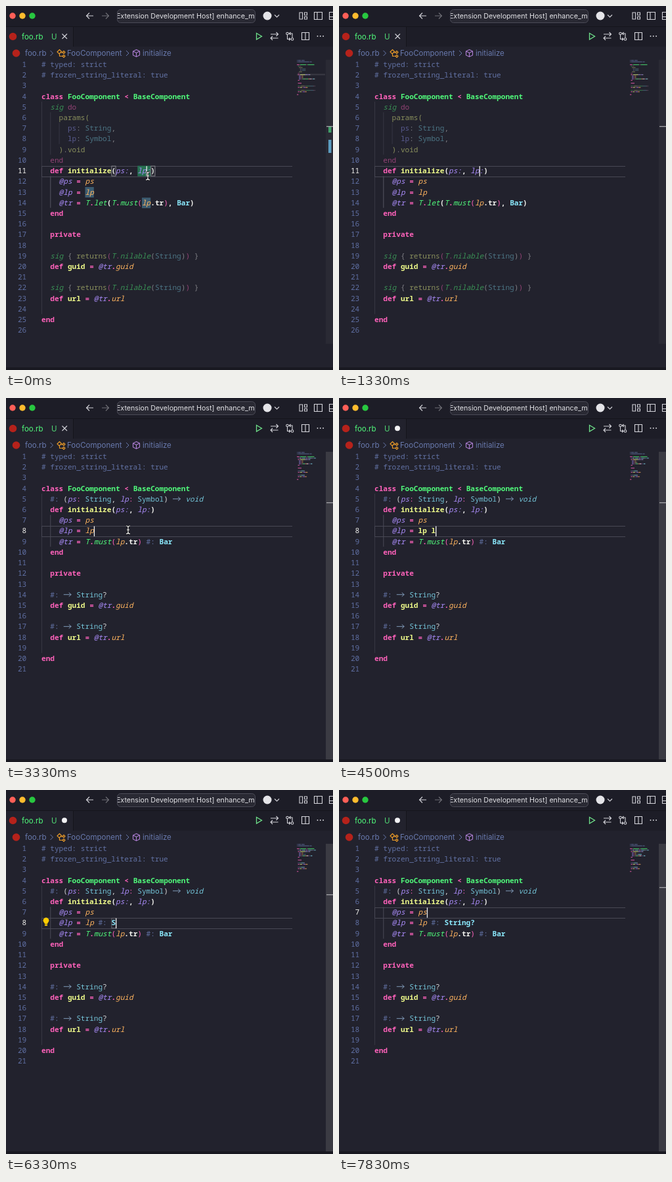
These frames come from a looping animation (498x555 px, 8 s). An HTML page:

```html
<!DOCTYPE html>
<html lang="en">
<head>
<meta charset="utf-8">
<title>Editor</title>
<style>
  html, body { margin: 0; width: 100%; height: 100%; overflow: hidden; background: #22222d; }
  svg { display: block; }
  text { white-space: pre; }
  .code text, .pop text { font: 11.08px "Noto Sans Mono", "DejaVu Sans Mono", monospace; }
  .ui text { font: 11.5px Inter, "Open Sans", sans-serif; }
  .line { fill: none; stroke: #d4d4da; stroke-width: 1.1; }
</style>
</head>
<body>
<svg width="498" height="555" viewBox="0 0 498 555">
  <defs><clipPath id="box"><rect x="170" y="5" width="209" height="20"/></clipPath></defs>
  <rect width="498" height="555" fill="#22222d"/>
  <rect width="498" height="62" fill="#1d1d27"/>
  <rect y="31" width="102" height="31" fill="#22222d"/>
  <path d="M0 31.5H498M102.5 31V62" stroke="#15151c" fill="none"/>
  <rect y="551" width="498" height="4" fill="#191921"/>
  <g class="ui">
    <circle cx="10" cy="15" r="4.7" fill="#ff5f57"/>
    <circle cx="25" cy="15" r="4.7" fill="#febc2e"/>
    <circle cx="40" cy="15" r="4.7" fill="#28c840"/>
    <path class="line" d="M133 15H122.500M127 10.500L122.500 15L127 19.500"/>
    <path class="line" stroke-opacity=".45" d="M146 15H156.500M152 10.500L156.500 15L152 19.500"/>
    <rect x="169.500" y="5.500" width="210" height="20" rx="5" fill="#292933" stroke="#4b4b57"/>
    <text x="378.500" y="19" text-anchor="end" clip-path="url(#box)" fill="#e2e2e6" style="font-size:10.7px">[Extension Development Host] enhance_m</text>
    <circle cx="398" cy="15" r="6.500" fill="#e4e4e8"/>
    <path class="line" d="M409 13.500L412.500 17L416 13.500"/>
    <path class="line" d="M447 10H451.500V20H447ZM454.500 10H458.500V14H454.500ZM454.500 16.500H458.500V20H454.500Z"/>
    <path class="line" d="M469.500 9.500H481.500V20.500H469.500ZM474 9.500V20.500M492.500 9.500H504V20.500H492.500ZM492.500 16.500H504"/>
    <circle cx="10.500" cy="46.500" r="5.800" fill="#b5221b"/>
    <text x="24" y="50.500" fill="#50fa7b">foo.rb</text>
    <text x="69" y="50.500" fill="#50d874">U</text>
    <path id="close" class="line" d="M85.500 42.500L93 50M93 42.500L85.500 50"/>
    <circle id="dirty" cx="89" cy="46.300" r="4" fill="#f2f2f4"/>
    <path d="M381.500 41.500L389.500 46.200L381.500 51Z" fill="none" stroke="#6fe08a" stroke-width="1.300"/>
    <path class="line" d="M403 43H414.500M411.500 40L414.500 43L411.500 46M414.500 49H403M406 46L403 49L406 52"/>
    <g class="line">
      <circle cx="428.500" cy="42" r="1.800"/><circle cx="436" cy="50.500" r="1.800"/>
      <path d="M428.500 44V50.500H432.500M431 48.500L433 50.500L431 52.500M436 48.500V42H432M433.500 40L431.500 42L433.500 44"/>
      <path d="M450.500 40.500H461.500V51.500H450.500ZM456 40.500V51.500"/>
    </g>
    <path d="M474.500 46H484" stroke="#d4d4da" stroke-width="1.900" stroke-linecap="round" stroke-dasharray="0 4.300"/>
    <circle cx="15.500" cy="72" r="5.800" fill="#b5221b"/>
    <g fill="#6879ad">
      <text x="29" y="76">foo.rb</text><text x="93" y="76">FooComponent</text><text x="208" y="76">initialize</text>
    </g>
    <path d="M67.500 68L71.500 72L67.500 76M183 68L187 72L183 76" fill="none" stroke="#6879ad"/>
    <path d="M78 70L81.500 66.500L84.500 69.500L81 73ZM83 71H86M81.500 72V76.500H86M86 70.500L88 68.500L90 70.500L88 72.500ZM86 76.500L88 74.500L90 76.500L88 78.500Z" fill="none" stroke="#ee9d28" stroke-width="1.100"/>
    <path d="M198.500 66.500L203.500 69V75L198.500 77.500L193.500 75V69ZM193.500 69L198.500 71.500L203.500 69M198.500 71.500V77.500" fill="none" stroke="#b180d7" stroke-width="1.100"/>
  </g>
  <g id="view" class="code"></g>
</svg>
<script>
const CW = 6.65, LH = 16.21, X0 = 54, LOOP = 8000;
const $ = id => document.getElementById(id);

// style key -> [colour, weight, italic]
const STYLE = {
  k: ['#ff62bb', 600, 0], y: ['#eefa8a', 600, 0], w: ['#f4f4f0', 600, 0], v: ['#a98bf8', 500, 1],
  p: ['#ffb45f', 500, 1], o: ['#ffb45f', 500, 1], g: ['#50fa7b', 500, 1], G: ['#50fa7b', 600, 0],
  c: ['#8be9fd', 600, 0], n: ['#6272a4', 400, 0], t: ['#74c4d8', 400, 0], i: ['#74c4d8', 400, 1],
  u: ['#a98bf8', 400, 1], b: ['#8f93f0', 400, 0], m: ['#ff62bb', 400, 0], x: ['#d8d8d8', 400, 0],
  a: ['#7f9ab8', 400, 0]
};

// a line is "style+text|style+text"; a leading ~ dims it
const HEAD = ['n# typed: strict', 'n# frozen_string_literal: true', '',
  'kclass |GFooComponent |k< |GBaseComponent'];
const INIT = 'k  def |yinitialize|w(|vps:|w, |vlp:|w)';
const PS = 'v    @ps|k = |pps', LP = 'v    @lp|k = ', TR = 'v    @tr|k = |gT';
const MUST = 'k.|gmust|m(|plp|w.tr|m)';
const LET = TR + '|k.|glet|w(|gT|' + MUST + '|w, |cBar|w)';
const GUID = 'k  def |yguid|k = |v@tr|k.|oguid', URL_LINE = 'k  def |yurl|k = |v@tr|k.|ourl';
const SIG = '~g  sig|x { |yreturns|m(|gT|k.|gnilable|x(|tString|x)|m)|x }';
const RBS = 'n  #: |a->|t String|x?';
const END = 'k  end', PRIVATE = 'k  private';

const oldDoc = [...HEAD, '~g  sig |kdo', '~y    params(', '~b      ps|x: |tString|x,', '~b      lp|x: |tSymbol|x,',
  '~y    )|x.|yvoid', '~k  end', INIT, PS, LP + '|plp', LET, END, '', PRIVATE, '',
  SIG, GUID, '', SIG, URL_LINE, '', 'kend', ''];
const newDoc = s => [...HEAD, 'n  #: |x(|ups|m: |tString|x, |ulp|m: |tSymbol|x) |a->|i void', INIT, PS,
  LP + '|' + s.lp, s.moved ? TR + '|' + MUST + '|n #: |cBar' : LET, END, '', PRIVATE, '',
  RBS, GUID, '', RBS, URL_LINE, '', 'kend', ''];

// state changes over time, each merged into the one before
const scenes = [];
let last = {};
const at = (t, change) => scenes.push(last = { ...last, ...change, t });
const typing = (t, step, text, make) =>
  [...text].forEach((_, i) => at(t + i * step, make(text.slice(0, i + 1))));

at(0, { old: true, lp: 'plp', line: 11, col: 24, marks: true, mouse: [216, 259] });
at(1170, { marks: false, mouse: null });
at(1670, { old: false, plain: true, line: 18, col: 0 });
at(2330, { plain: false });
at(2830, { moved: true, line: 9, col: 30 });
at(3170, { line: 8, col: 12, mouse: [186, 201] });
typing(4320, 160, ' let', s => ({ lp: 'ylp' + s, col: 12 + s.length, dirty: true, mouse: null, popup: s.length > 2 }));
at(5670, { lp: 'plp|n #: |cType', col: 20, popup: false, field: 4 });
typing(6170, 170, 'String?', s => ({ lp: 'plp|n #: |c' + s, col: 16 + s.length, field: s.length, bulb: s.length < 3 }));
at(7670, { line: 7, col: 12, field: 0, bulb: false });

const mid = n => 89 + LH * (n - 1);
const colX = c => X0 + CW * c;
const esc = s => s.replace(/&/g, '&amp;').replace(/</g, '&lt;');
const rect = (x, y, w, h, fill, more = '') => `<rect x="${x}" y="${y}" width="${w}" height="${h}" fill="${fill}" ${more}/>`;
const path = (d, stroke, w = 1) => `<path d="${d}" fill="none" stroke="${stroke}" stroke-width="${w}"/>`;
const text = (x, y, s, fill, weight = 400, italic = 0, more = '') =>
  `<text x="${x.toFixed(2)}" y="${y.toFixed(2)}" fill="${fill}" style="font-weight:${weight};font-style:${italic ? 'italic' : 'normal'};${more}">${esc(s)}</text>`;

function tokens(line) {
  let col = 0;
  return line.replace('~', '').split('|').filter(Boolean).map(part => {
    const token = { key: part[0], s: part.slice(1), col };
    col += token.s.length;
    return token;
  });
}

function codeLine(line, x, y, plain) {
  const dim = line[0] === '~';
  const out = tokens(line).map(({ key, s, col }) => {
    const [fill, weight, italic] = STYLE[plain && key === 'p' ? 'w' : key];
    const tx = x + col * CW;
    if (key === 'a') return path(`M${tx + .5} ${y - 4}h11.500m-3.500 -3l3.500 3l-3.500 3`, fill);
    return text(tx, y, s, fill, dim ? 400 : weight, italic);
  }).join('');
  return dim ? `<g opacity=".5">${out}</g>` : out;
}

function minimap(doc) {
  let out = '';
  doc.forEach((line, i) => tokens(line).forEach(({ key, s, col }) => {
    for (const word of s.matchAll(/\S+/g))
      out += rect(443 + (col + word.index) * .78, 82.4 + i * 2.17, word[0].length * .78, 1.2, STYLE[key][0], `opacity="${line[0] === '~' ? .35 : .7}"`);
  }));
  return out;
}

function guides(old) {
  const bar = (col, a, b, color = '#373743') => path(`M${colX(col) + .5} ${mid(a) - 8}V${mid(b) + 8}`, color);
  return old
    ? bar(0, 5, 24) + bar(2, 6, 9) + bar(4, 7, 8) + bar(2, 12, 14, '#555562')
    : bar(0, 5, 19) + bar(2, 7, 9, '#4b4b58');
}

function marks() {
  const hit = (line, col, n, fill) => rect(colX(col), mid(line) - 7.5, CW * n, 16, fill);
  const bracket = col => rect(colX(col) + .5, mid(11) - 7, CW - .5, 15, 'none', 'stroke="#85858c"');
  return hit(11, 22, 3, '#277052') + hit(13, 10, 2, '#3b5b70') + hit(14, 23, 2, '#3b5b70') + bracket(16) + bracket(25);
}

function popup() {
  const note = (s, y) => text(133.5, y, s, '#b9b9c0');
  return '<g class="pop">' + rect(128.5, 210.5, 380, 107.5, '#1e1e28', 'stroke="#3b3b48"') +
    rect(129, 211, 369, 17.5, '#42455a') +
    rect(133.5, 214.5, 10, 10, 'none', 'stroke="#d8d8dc" stroke-dasharray="1.500 1.500"') +
    text(149, 223.5, 'let', '#8be9fd', 600) + text(467, 223, 'RBS le', '#c4c4cc', 400, 0, 'font-size:9.600px') +
    text(131, 240, 'abc', '#d4d4da', 400, 0, 'font-family:Inter,sans-serif;font-size:8px') +
    [['frozen_string_', 0], ['l', 14], ['i', 15], ['te', 16], ['ral', 18]]
      .map(([s, c]) => text(149 + c * CW, 240.5, s, /^(l|te)$/.test(s) ? '#8be9fd' : '#f0f0ec', 600)).join('') +
    path('M129 247.500H498', '#30303b') +
    note('Define the type of a variable/constant using RBS (RBS', 262) + note('Snippets)', 278.2) +
    codeLine('n#: |cType', 134, 309.5) + '</g>';
}

function pointer([x, y]) {
  const d = `M${x - 3} ${y - 6}q3 0 3 2v8q0 2 -3 2m6 -12q-3 0 -3 2m0 8q0 2 3 2m-5 -6h4`;
  return path(d, '#111', 2.6) + path(d, '#fff', 1.1);
}

function bulb(x, y) {
  return `<path d="M${x - 2} ${y + 3}q0 -1.500 -1.500 -3a4.300 4.300 0 1 1 7 0q-1.500 1.500 -1.500 3z" fill="#ffcc00"/>` +
    rect(x - 2, y + 3.7, 4, 1.9, '#ffcc00');
}

function ruler(s) {
  const y = s.old ? 183 : Math.round(72 + 10.9 * s.line);
  const slider = s.old ? rect(487, 82, 11, 433, '#2a2a34') : rect(487, 82, 11, 469, '#3b3b43');
  return slider +
    (s.marks ? rect(491, 184, 4.5, 9, '#3f9d68') + rect(491, 204, 4.5, 20, '#5b9cc0') : '') +
    rect(488, y, 10, 1.3, '#a5a5aa');
}

function currentLine(y) {
  const top = Math.round(y - 7.4) + .5, bottom = Math.round(y + 9) + .5;
  return path(`M436 ${top}H54.500V${bottom}H436`, '#484854');
}

function render(s, caret) {
  const doc = s.old ? oldDoc : newDoc(s), y = mid(s.line);
  let out = guides(s.old) + currentLine(y);
  if (s.marks) out += marks() + rect(443, 103.5, 43, 2, '#4a4a55', 'opacity=".6"');
  if (s.field) out += rect(colX(16) + .5, y - 7, CW * s.field, 15, 'none', 'stroke="#66666f"');
  doc.forEach((line, i) => {
    const n = i + 1, on = n === s.line, label = String(n);
    out += text(31.2 - label.length * CW, mid(n) + 4, label, on ? '#f4f4f0' : '#5f6fa3', on ? 500 : 400);
    out += codeLine(line, X0, mid(n) + 4, s.plain);
  });
  if (caret) out += rect(colX(s.col), y - 7, 1.3, 15.5, '#eeeeee');
  if (s.bulb) out += bulb(61, y - 1);
  out += minimap(doc) + ruler(s);
  if (s.popup) out += popup();
  if (s.mouse) out += pointer(s.mouse);
  $('view').innerHTML = out;
  $('close').style.display = s.dirty ? 'none' : '';
  $('dirty').style.display = s.dirty ? '' : 'none';
}

const start = performance.now();
let shown = '';
function tick() {
  const t = (performance.now() - start) % LOOP;
  const s = scenes.filter(scene => scene.t <= t).pop();
  const caret = Math.floor((t - s.t) / 500) % 2 === 0;
  const key = s.t + '/' + caret;
  if (key !== shown) render(s, caret);
  shown = key;
  requestAnimationFrame(tick);
}
tick();
</script>
</body>
</html>
```
